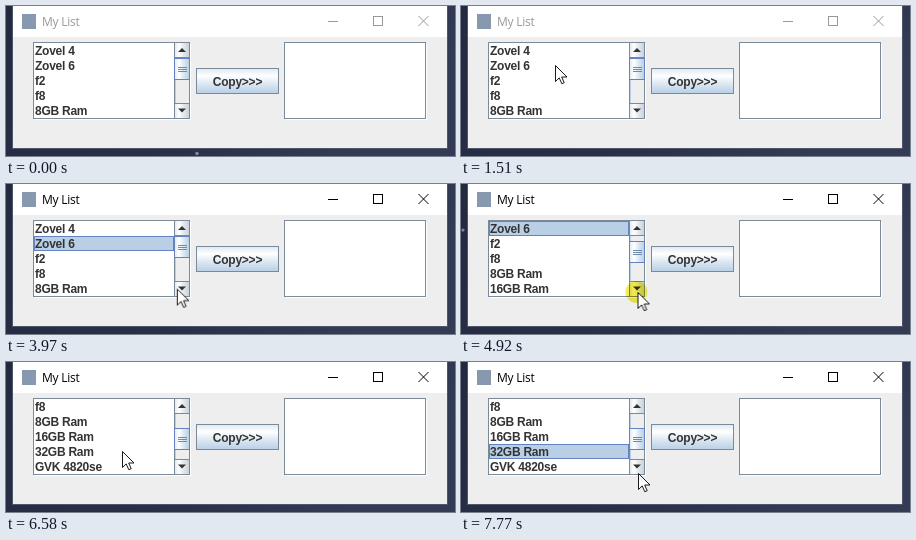
An HTML page for the animation above (8 s loop, 449 by 150 pixels).

```html
<!DOCTYPE html>
<html lang="en">
<head>
<meta charset="utf-8">
<title>My List</title>
<style>
  html, body { margin: 0; width: 100%; height: 100%; overflow: hidden; background: #232a40; }
  svg { display: block; }
  .ui { font: bold 12px "Liberation Sans", Arial, sans-serif; letter-spacing: -.25px; fill: #333; }
  .title { font: 12px "Open Sans", "Noto Sans", sans-serif; letter-spacing: -.25px; }
  .edge { fill: #fff; stroke: #7a8a99; }
  .crisp { shape-rendering: crispEdges; }
  .anim { animation: 8s linear infinite; }

  /* 1% of the loop is 80 ms */
  .active { animation-name: activate; animation-timing-function: step-end; }
  .rows { animation-name: scroll; animation-timing-function: step-end; }
  .thumb { animation-name: thumb; animation-timing-function: step-end; }
  .pick { animation-name: pick; animation-timing-function: step-end; }
  .pointer { animation-name: move; animation-timing-function: ease-in-out; }
  .glow { animation-name: press; mix-blend-mode: multiply; }
  .fade { animation-name: fade; }
  .drift { animation-name: drift; }

  @keyframes activate {
    0% { fill: #999; stroke: #999; }
    30.75%, 100% { fill: #000; stroke: #000; }
  }
  @keyframes scroll {
    0% { transform: translateY(0); }
    59% { transform: translateY(-15px); }
    65.4% { transform: translateY(-30px); }
    69%, 100% { transform: translateY(-45px); }
  }
  @keyframes thumb {
    0% { transform: translateY(0); }
    59% { transform: translateY(5px); }
    65.4% { transform: translateY(9px); }
    69%, 100% { transform: translateY(14px); }
  }
  @keyframes pick {
    0% { transform: translateY(0); opacity: 0; }
    30.75% { transform: translateY(15px); opacity: 1; }
    84.2%, 100% { transform: translateY(90px); opacity: 1; }
  }
  @keyframes move {
    0% { transform: translate(190px, 152px); }
    17.5%, 41% { transform: translate(94px, 59px); }
    51.6%, 64% { transform: translate(176.5px, 108px); }
    70%, 74% { transform: translate(172px, 108px); }
    81.5%, 87% { transform: translate(116px, 89px); }
    96.5%, 100% { transform: translate(177px, 111px); }
  }
  @keyframes press {
    0%, 30.7% { opacity: 0; }
    31%, 34% { opacity: .8; }
    35.5%, 58% { opacity: 0; }
    58.8%, 61.8% { opacity: .8; }
    63%, 64.8% { opacity: 0; }
    65.4%, 67% { opacity: .8; }
    67.8%, 68.5% { opacity: 0; }
    69%, 70.5% { opacity: .8; }
    72%, 84% { opacity: 0; }
    84.3%, 86% { opacity: .8; }
    87.5%, 100% { opacity: 0; }
  }
  @keyframes fade {
    0% { opacity: 1; }
    15%, 100% { opacity: 0; }
  }
  @keyframes drift {
    0%, 56% { transform: translateY(20px); opacity: 0; }
    61.5% { transform: translateY(46px); opacity: 1; }
    73.4% { transform: translateY(92px); opacity: 1; }
    80%, 100% { transform: translateY(117px); opacity: 0; }
  }
</style>
</head>
<body>
<svg width="449" height="150" viewBox="0 0 449 150">
  <defs>
    <linearGradient id="desk" x2="1" y2=".35">
      <stop stop-color="#232a40"/>
      <stop offset=".6" stop-color="#282f47"/>
      <stop offset="1" stop-color="#343b55"/>
    </linearGradient>
    <linearGradient id="down" x2="0" y2="1">
      <stop stop-color="#dde8f3"/>
      <stop offset=".3" stop-color="#fff"/>
      <stop offset=".6" stop-color="#dde8f3"/>
      <stop offset="1" stop-color="#b8cfe5"/>
    </linearGradient>
    <linearGradient id="across" href="#down" x2="1" y2="0"/>
    <linearGradient id="grey">
      <stop stop-color="#e2e6ea"/>
      <stop offset=".3" stop-color="#fff"/>
      <stop offset=".6" stop-color="#e4e9ee"/>
      <stop offset="1" stop-color="#c6d0da"/>
    </linearGradient>
    <clipPath id="view"><rect x="28" y="37" width="140" height="75"/></clipPath>
  </defs>

  <!-- Desktop and window -->
  <rect width="449" height="150" fill="url(#desk)"/>
  <g fill="#858b9a">
    <circle class="anim fade" cx="191" cy="147.5" r="1.8"/>
    <circle class="anim drift" cx="2" cy="0" r="1.6"/>
  </g>
  <rect class="crisp" x="6.5" y="-.5" width="435" height="143" fill="#eee" stroke="#50566a"/>
  <rect x="7" width="434" height="31" fill="#fff"/>

  <!-- Title bar -->
  <rect x="16" y="8" width="14" height="15" fill="#8799ae"/>
  <g class="anim active">
    <text class="title" x="36" y="20" stroke="none">My List</text>
    <g fill="none">
      <path class="crisp" d="M322 15.5h10M367.5 10.5h9v9h-9z"/>
      <path d="M412.5 10l10 10m0-10l-10 10"/>
    </g>
  </g>

  <!-- Source list -->
  <g class="crisp">
    <rect x="29" y="38" width="156" height="76" fill="#fff"/>
    <rect class="edge" x="27.5" y="36.5" width="156" height="76"/>
  </g>
  <g clip-path="url(#view)">
    <g class="anim rows">
      <g class="anim pick crisp">
        <rect x="28.5" y="37.5" width="139" height="14" fill="#b8cfe5" stroke="#6382bf"/>
      </g>
      <g id="items" class="ui"></g>
    </g>
  </g>

  <!-- Scroll bar -->
  <g class="crisp">
    <rect x="168.5" y="36.5" width="15" height="76" fill="#eee" stroke="#7a8a99"/>
    <path d="M169.5 52v45" stroke="#b8cfe5"/>
    <g fill="url(#grey)" stroke="#7a8a99">
      <rect x="168.5" y="36.5" width="15" height="15"/>
      <rect x="168.5" y="97.5" width="15" height="15"/>
    </g>
    <g class="anim thumb">
      <rect x="168.5" y="52.5" width="15" height="21" fill="url(#across)" stroke="#6382bf"/>
      <path d="M172 61.5h9m-9 2h9m-9 2h9" stroke="#7189ab"/>
    </g>
  </g>
  <path d="M172 46l4-4 4 4zM172 102.5l4 4 4-4z" fill="#333"/>

  <!-- Copy button -->
  <rect class="crisp" x="190.5" y="62.5" width="82" height="25" fill="url(#down)" stroke="#7a8a99"/>
  <text class="ui" x="231.5" y="79.5" text-anchor="middle">Copy&gt;&gt;&gt;</text>

  <!-- Target list -->
  <g class="crisp">
    <rect x="280" y="38" width="141" height="76" fill="#fff"/>
    <rect class="edge" x="278.5" y="36.5" width="141" height="76"/>
  </g>

  <g class="anim pointer">
    <circle class="anim glow" cx="-1" cy="0" r="11" fill="#f4e722"/>
    <path d="M.5.5v16l3.7-3.6 2.6 5.8 2.4-1-2.5-5.7h5.3z" fill="#fff" stroke="#000" stroke-width=".9"/>
  </g>
</svg>
<script>
  const names = ["Zovel 4", "Zovel 6", "f2", "f8", "8GB Ram", "16GB Ram", "32GB Ram", "GVK 4820se"];
  document.getElementById("items").innerHTML =
    names.map((name, i) => `<text x="29" y="${49 + 15 * i}">${name}</text>`).join("");
</script>
</body>
</html>
```
